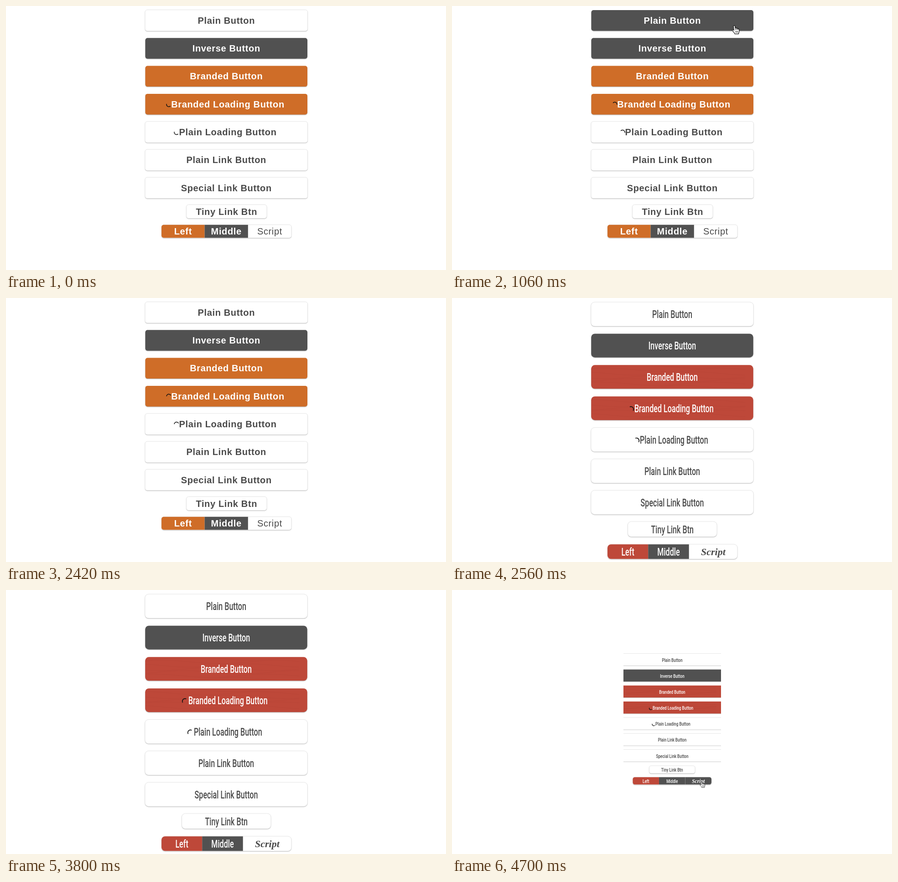
Write an HTML page with a canvas that moves like this. It is 965x580 px and loops after 4.72 s.

```html
<!DOCTYPE html>
<html lang="en">
<head>
<meta charset="utf-8">
<title>Button themes</title>
<style>
  html, body { margin: 0; width: 100%; height: 100%; overflow: hidden; background: #fff; }
  canvas { display: block; }
</style>
</head>
<body>
<canvas id="stage" width="965" height="580"></canvas>
<script>
const ctx = document.getElementById('stage').getContext('2d');
const LOOP = 4720;
const SPIN = 715;
const DARK = '#515151', INK = '#4a4a4a', WHITE = '#fff';

const labels = ['Plain Button', 'Inverse Button', 'Branded Button', 'Branded Loading Button',
  'Plain Loading Button', 'Plain Link Button', 'Special Link Button'];

const sans = { font: 'bold 20px "Liberation Sans", Arial, sans-serif', spacing: '0.65px', narrow: 1, cap: 14.2 };
const sansLight = { ...sans, font: '20px "Liberation Sans", Arial, sans-serif' };
const condensed = size => ({ font: `500 ${size}px Roboto, sans-serif`, spacing: '0px', narrow: 0.7, cap: size * 0.71 });
const script = size => ({ font: `italic bold ${size}px "Liberation Serif", serif`, spacing: '0px', narrow: 1, cap: size * 0.66 });

const orange = {
  brand: '#cf6d28', x: 305, w: 356.5, top: 8.5, pitch: 61.3, h: 46.5, radius: 5,
  tiny: [395.5, 436.5, 176.5, 30], bar: [341, 480.5, 285, 29], splits: [0, 0.332, 0.666, 1],
  type: sans, scriptType: sansLight, textDrop: 0, barDrop: 0, loadingX: 486.5,
  spinner: { x: [357, 374], drop: 0.6, r: 5, line: 1.5, angle: 210 }
};
const red = {
  brand: '#be4839', grain: true, x: 304.8, w: 356.4, top: 9, pitch: 68.9, h: 53, radius: 8,
  tiny: [385.5, 491, 195.5, 33.5], bar: [341, 541, 285, 32.5], splits: [0, 0.313, 0.627, 1],
  type: condensed(23), scriptType: script(22), textDrop: 0.8, barDrop: 0.6, loadingX: 486.8,
  spinner: { x: [392.5, 404.5], drop: 2.2, r: 5.8, line: 1.7, angle: 200 }
};
const small = {
  brand: '#be4839', grain: true, square: true, x: 376, w: 214, top: 139.5, pitch: 35.15, h: 27, radius: 4.5,
  tiny: [432.5, 386, 100.5, 17], bar: [396.5, 411, 172.5, 16.5], splits: [0, 0.333, 0.667, 1],
  type: condensed(11.8), scriptType: script(11.5), textDrop: 0.5, barDrop: 0.7, loadingX: 484.5,
  spinner: { x: [436, 442.5], drop: 1.2, r: 3.5, line: 1.2, angle: 5 }
};

// Keys are [time, x, y].
const entry = [[60, 870, 37], [560, 668, 46], [760, 619, 43], [1780, 619, 43], [2120, 855, 37]];
const barMove = [[4200, 482, 421], [4380, 490, 421], [4600, 547, 421], [LOOP, 547, 421]];

function along(keys, t) {
  const i = keys.findIndex((k, n) => n && t <= k[0]);
  if (i < 0 || t < keys[0][0]) return null;
  const [t0, x0, y0] = keys[i - 1], [t1, x1, y1] = keys[i];
  const u = (t - t0) / (t1 - t0), e = u * u * (3 - 2 * u);
  return { x: x0 + (x1 - x0) * e, y: y0 + (y1 - y0) * e };
}

function text(str, x, y, type, color) {
  ctx.save();
  ctx.translate(x, y + type.cap / 2);
  ctx.scale(type.narrow, 1);
  ctx.font = type.font;
  ctx.letterSpacing = type.spacing;
  ctx.textAlign = 'center';
  ctx.fillStyle = color;
  ctx.fillText(str, 0, 0);
  ctx.restore();
}

function box(x, y, w, h, r, fill) {
  const inset = fill === WHITE ? 0 : 0.5;
  ctx.save();
  ctx.beginPath();
  ctx.roundRect(x + inset, y + inset, w - 2 * inset, h - 2 * inset, r);
  ctx.shadowColor = 'rgba(0,0,0,.32)';
  ctx.shadowBlur = 1.5;
  ctx.shadowOffsetY = 1;
  ctx.fillStyle = fill;
  ctx.fill();
  ctx.restore();
  if (fill === WHITE) {
    ctx.strokeStyle = '#e0e0e0';
    ctx.lineWidth = 0.8;
    ctx.stroke();
  }
}

function flatBox(x, y, w, h, fill) {
  ctx.fillStyle = fill;
  ctx.fillRect(x, y, w, h);
  if (fill === WHITE) {
    ctx.fillStyle = '#e6e6e6';
    ctx.fillRect(x, y - 0.5, w, 1);
  }
  ctx.fillStyle = '#cbcbcb';
  ctx.fillRect(x, y + h - 0.5, w, 1);
}

function woodGrain(x, y, w, h, seed) {
  ctx.save();
  ctx.beginPath();
  ctx.rect(x + 1, y + 1, w - 2, h - 2);
  ctx.clip();
  ctx.strokeStyle = 'rgba(90,20,15,.07)';
  ctx.lineWidth = 0.7;
  for (let i = 0; i < 7; i++) {
    const base = y + h * (i + 0.5) / 7;
    ctx.beginPath();
    for (let u = 0; u <= 1; u += 0.05) {
      ctx.lineTo(x + w * u, base + h * 0.07 * Math.sin(u * 9 + i * 1.7 + seed));
    }
    ctx.stroke();
  }
  ctx.restore();
}

function spinner(x, y, s, t) {
  const mid = (s.angle + t / SPIN * 360 - 90) * Math.PI / 180;
  ctx.beginPath();
  ctx.arc(x, y, s.r, mid - 1.3, mid + 1.3);
  ctx.strokeStyle = '#111';
  ctx.lineWidth = s.line;
  ctx.stroke();
}

function buttonRow(v, i, hover, t) {
  const y = v.top + i * v.pitch, mid = y + v.h / 2;
  const branded = i === 2 || i === 3, loading = i === 3 || i === 4;
  const fill = branded ? v.brand : i === 1 || hover ? DARK : WHITE;
  if (v.square) flatBox(v.x, y, v.w, v.h, fill);
  else box(v.x, y, v.w, v.h, v.radius, fill);
  if (branded && v.grain) woodGrain(v.x, y, v.w, v.h, i);
  text(labels[i], loading ? v.loadingX : v.x + v.w / 2, mid + v.textDrop, v.type, fill === WHITE ? INK : WHITE);
  if (loading) spinner(v.spinner.x[i - 3], mid + v.spinner.drop, v.spinner, t);
}

function buttonBar(v, hover) {
  const [x, y, w, h] = v.bar;
  box(x, y, w, h, v.radius, WHITE);
  ['Left', 'Middle', 'Script'].forEach((label, i) => {
    const left = x + w * v.splits[i], width = w * (v.splits[i + 1] - v.splits[i]);
    const fill = i === 0 ? v.brand : i === 1 || hover ? DARK : WHITE;
    if (fill !== WHITE) {
      const r = v.radius;
      ctx.beginPath();
      ctx.roundRect(left, y + 0.2, width, h - 0.4, [[r, 0, 0, r], 0, [0, r, r, 0]][i]);
      ctx.fillStyle = fill;
      ctx.fill();
    }
    text(label, left + width / 2, y + h / 2 + v.barDrop, i === 2 ? v.scriptType : v.type, fill === WHITE ? INK : WHITE);
  });
}

const arrowShape = new Path2D('M0 0V15L3.6 11.8 6 17.3 8.6 16.2 6.2 10.8H11Z');
const handShape = new Path2D(`M-1.7 1.5C-1.7 -.6 1.5 -.6 1.7 1.5L2.3 6.2C3 4.2 5.3 4.6 5.4 6.6
  C6.2 5.2 8 5.8 8.2 7.5C9.2 6.5 10.8 7.4 10.8 9V12.5C10.8 15 9.5 15.5 9.5 18.3H1
  C1 16 -1.5 14.5 -3.2 12C-6.2 9 -3.4 7.5 -.8 10.5Z`);

function cursor(p, hand, scale) {
  ctx.save();
  ctx.translate(p.x, p.y);
  ctx.scale(scale, scale);
  const shape = hand ? handShape : arrowShape;
  ctx.fillStyle = hand ? WHITE : '#111';
  ctx.strokeStyle = hand ? '#111' : WHITE;
  ctx.lineWidth = 1.2;
  ctx.lineJoin = 'round';
  ctx.fill(shape);
  ctx.stroke(shape);
  if (hand) {
    ctx.lineWidth = 0.9;
    ctx.beginPath();
    for (const x of [2.4, 5.3, 8.1]) {
      ctx.moveTo(x, 6.5);
      ctx.lineTo(x, 10);
    }
    for (const x of [3.2, 5.4, 7.6]) {
      ctx.moveTo(x, 12);
      ctx.lineTo(x, 15.5);
    }
    ctx.stroke();
  }
  ctx.restore();
}

function draw(t) {
  const v = t < 2560 ? orange : t < 4060 ? red : small;
  const pointer = v === orange ? along(entry, t) : v === small ? along(barMove, t) : null;
  const overPlain = v === orange && pointer && pointer.x < v.x + v.w;
  const overScript = v === small && pointer && pointer.x > 511;

  ctx.fillStyle = WHITE;
  ctx.fillRect(0, 0, 965, 580);
  labels.forEach((_, i) => buttonRow(v, i, i === 0 && overPlain && t < 1360, t));
  const [x, y, w, h] = v.tiny;
  box(x, y, w, h, v.radius, WHITE);
  text('Tiny Link Btn', x + w / 2, y + h / 2 + v.textDrop, v.type, INK);
  buttonBar(v, overScript);
  if (pointer) cursor(pointer, overPlain || v === small, v === small ? 0.7 : 1);
}

const start = performance.now();
function tick() {
  draw((performance.now() - start) % LOOP);
  requestAnimationFrame(tick);
}
tick();
</script>
</body>
</html>
```
